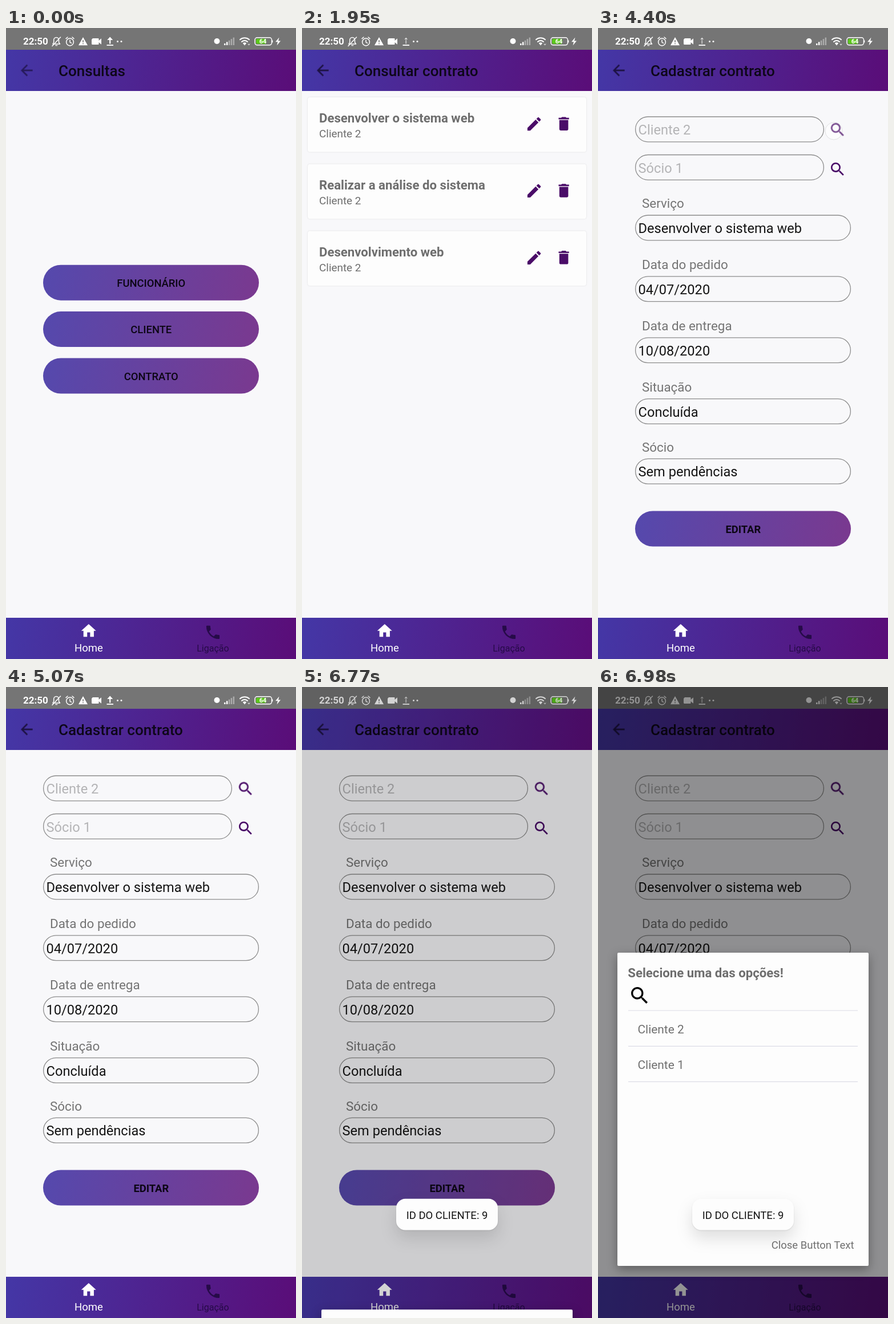
Write an HTML page that moves like this. It is 508 px wide and 1102 px high and loops after 7.03 s.

```html
<!DOCTYPE html>
<html lang="pt-BR">
<head>
<meta charset="utf-8">
<title>Consultas</title>
<style>
html, body { margin: 0; width: 100%; height: 100%; overflow: hidden; background: #f8f8fa; }
svg { display: block; width: 508px; height: 1102px; font-family: Roboto, "Open Sans", sans-serif; }
text { white-space: pre; }
.title { font-size: 26px; font-weight: 500; fill: #0d0718; }
.btn { font-size: 18.4px; text-anchor: middle; fill: #0c0614; }
.card { fill: #fdfdfd; filter: drop-shadow(0 .5px .8px rgba(0,0,0,.12)); }
.ltitle { font-size: 22.2px; font-weight: 700; fill: #6e6e6e; }
.lsub { font-size: 18.9px; fill: #6e6e6e; }
.detail { font-size: 26.1px; fill: #6e6e6e; }
.b { font-weight: 700; }
.label { font-size: 22.4px; fill: #747474; }
.value { font-size: 23.6px; fill: #141414; }
.hint { font-size: 23.6px; fill: #b4b4b6; }
.field { fill: none; stroke: #8c8c8c; stroke-width: 1.3; }
.small { font-size: 18.5px; }
.option { font-size: 20.9px; fill: #707070; }
.line { stroke: #dcdce6; stroke-width: 1.2; }
.purple { fill: #4a0c68; }
</style>
</head>
<body>
<svg viewBox="0 0 508 1102">
  <defs>
    <linearGradient id="bar" gradientUnits="userSpaceOnUse" x1="0" y1="0" x2="508" y2="72">
      <stop offset="0" stop-color="#4437a6"/><stop offset="1" stop-color="#5a0d78"/>
    </linearGradient>
    <linearGradient id="pill" gradientUnits="userSpaceOnUse" x1="0" y1="0" x2="378" y2="62">
      <stop offset="0" stop-color="#5549ad"/><stop offset="1" stop-color="#7a398f"/>
    </linearGradient>
  </defs>
  <rect width="508" height="1102" fill="#f8f8fa"/>
  <rect width="508" height="38" fill="#757575"/>
  <rect width="508" height="72" fill="url(#bar)" transform="translate(0 38)"/>
  <rect width="508" height="72" fill="url(#bar)" transform="translate(0 1030)"/>
  <g id="status" fill="#fff" stroke="#fff" stroke-width="0"></g>
  <g id="nav"></g>
  <g id="menu"></g>
  <g id="list"></g>
  <g id="details"></g>
  <g id="form"></g>
  <rect id="dim" width="508" height="1102" opacity="0"/>
  <g id="modal"></g>
  <g id="toast" opacity="0"></g>
</svg>
<script>
const LOOP = 7030;
const $ = id => document.getElementById(id);

const ICON = {
  back: 'M20,11V13H8L13.5,18.5L12.08,19.92L4.16,12L12.08,4.08L13.5,5.5L8,11H20Z',
  home: 'M10,20V14H14V20H19V12H22L12,3L2,12H5V20H10Z',
  phone: 'M6.62,10.79C8.06,13.62 10.38,15.94 13.21,17.38L15.41,15.18C15.69,14.9 16.08,14.82 16.43,14.93C17.55,15.3 18.75,15.5 20,15.5A1,1 0 0,1 21,16.5V20A1,1 0 0,1 20,21A17,17 0 0,1 3,4A1,1 0 0,1 4,3H7.5A1,1 0 0,1 8.5,4C8.5,5.25 8.7,6.45 9.07,7.57C9.18,7.92 9.1,8.31 8.82,8.59Z',
  pencil: 'M20.71,7.04C21.1,6.65 21.1,6 20.71,5.63L18.37,3.29C18,2.9 17.35,2.9 16.96,3.29L15.12,5.12L18.87,8.87M3,17.25V21H6.75L17.81,9.93L14.06,6.18Z',
  trash: 'M19,4H15.5L14.5,3H9.5L8.5,4H5V6H19M6,19A2,2 0 0,0 8,21H16A2,2 0 0,0 18,19V7H6Z',
  search: 'M15.5 14h-.79l-.28-.27A6.5 6.5 0 1 0 13.73 14.43l.27.28v.79l5 4.99L20.49 19zM9.5 14a4.5 4.5 0 1 1 0-9a4.5 4.5 0 0 1 0 9z'
};

const icon = (name, x, y, k, attrs) =>
  `<path d="${ICON[name]}" transform="translate(${x} ${y}) scale(${k})" fill-rule="evenodd" ${attrs}/>`;
const text = (cls, x, y, s, attrs = '') => `<text class="${cls}" x="${x}" y="${y}" ${attrs}>${s}</text>`;
const title = s => text('title', 92, 84.3, s);
const pill = (y, s, weight) => `<g transform="translate(65 ${y})">
  <rect width="378" height="62" rx="31" fill="url(#pill)"/>${text('btn', 189.3, 38, s, `font-weight="${weight}"`)}</g>`;
const field = (y, w, cls, s) =>
  `<rect class="field" x="65.6" y="${y}" width="${w}" height="43.8" rx="21.9"/>${text(cls, 70.6, y + 31.1, s)}`;

$('status').innerHTML = `
  <text x="30" y="29.3" font-size="17" font-weight="700">22:50</text>
  <g fill="none" stroke-width="1.5" stroke-linecap="round" stroke-linejoin="round">
    <path d="M82 28h12.5l-2-3v-4a4.4 4.4 0 0 0-8.8 0v4zM87 30.6h2.6M81 31.5L95.5 16"/>
    <circle cx="112" cy="24.5" r="6.4"/><path d="M112 21v3.8l2.6 1.6M105 18.6l3-2.6M119 18.6l-3-2.6"/>
    <path d="M176.5 30h11.5" stroke-width="1.8" stroke-linecap="butt"/>
    <path d="M410 20.3a12 12 0 0 1 16 0M413 24a7.6 7.6 0 0 1 10 0" stroke-width="2"/>
    <rect x="436" y="16.8" width="29.5" height="13" rx="4"/>
  </g>
  <path d="M135 16l8 14.3h-16z"/>
  <path d="M134.2 21h1.6v4h-1.6zM134.2 26.6h1.6v1.6h-1.6z" fill="#757575"/>
  <path d="M151.5 18h10a1 1 0 0 1 1 1v3l4.5-3.8v10.6l-4.5-3.8v3a1 1 0 0 1-1 1h-10a1.5 1.5 0 0 1-1.5-1.5v-7a1.5 1.5 0 0 1 1.500-1.500z"/>
  <path id="upFull" d="M182.2 15.5l5 5.500h-3.900v6.500h-2.200v-6.500h-3.900z"/>
  <g id="upPart"><path d="M182.2 16.500l2.800 3.500h-5.600z" opacity=".75"/><path d="M181.300 21h1.800v6.500h-1.800z" opacity=".6"/></g>
  <circle cx="195.500" cy="23.500" r="1.500"/><circle cx="202" cy="23.500" r="1.500"/>
  <circle cx="369.500" cy="23" r="5"/>
  ${[0, 1, 2, 3, 4].map(i => `<rect x="${382 + i * 3.9}" y="${27 - i * 2.6}" width="2.500" height="${3 + i * 2.6}" opacity="${i < 2 ? 1 : .4}"/>`).join('')}
  <path d="M418 30.500l-3.200-4a4.500 4.500 0 0 1 6.400 0z"/>
  <path d="M424 27.500l1.500 2.500 1.500-2.500" fill="none" stroke-width="1"/>
  <rect x="438" y="18.800" width="18" height="9" rx="2" fill="#5cc81c"/>
  <path d="M466.500 21.500v3.800" stroke-width="1.600"/>
  <text x="450" y="27.300" font-size="11" font-weight="700" text-anchor="middle">64</text>
  <path d="M478.500 16.500l-6.500 7.700h4l-1.500 6.300 6.500-8h-4z"/>`;

$('nav').innerHTML =
  icon('back', 20.6, 58.4, 1.3, 'id="back" fill="#1d1242"') +
  icon('home', 129.2, 1037.2, 1.3, 'fill="#fff"') +
  text('small', 145, 1088.6, 'Home', 'text-anchor="middle" fill="#fff"') +
  icon('phone', 347, 1040, 1.29, 'fill="#260b48"') +
  text('', 362.4, 1088.6, 'Ligação', 'font-size="16" text-anchor="middle" fill="#260b48"');

$('menu').innerHTML = title('Consultas') +
  ['FUNCIONÁRIO', 'CLIENTE', 'CONTRATO'].map((s, i) => pill(413.7 + i * 81.4, s, 500)).join('');

$('list').innerHTML = title('Consultar contrato') + '<g id="cards">' +
  ['Desenvolver o sistema web', 'Realizar a análise do sistema', 'Desenvolvimento web'].map((s, i) =>
    `<g transform="translate(0 ${i * 116.8})"><rect class="card" x="10" y="121" width="488" height="95.500" rx="4"/>` +
    text('ltitle', 30, 165, s) + text('lsub', 30, 191, 'Cliente 2') +
    icon('pencil', 391, 152, 1.3, 'class="purple"') + icon('trash', 443, 151.6, 1.3, 'class="purple"') + '</g>'
  ).join('') + '</g>';

const facts = [
  ['Cliente', 'Cliente 2'], ['CNPJ', '98765432198765'], ['Telefone', '11111111111'],
  ['Serviço', 'Desenvolver o sistema web'], ['Sócio', 'Sócio 1'], ['Cargo', 'Desenvolvedor Mobile'],
  ['Data do pedido', '04/07/2020'], ['Data de entrega', '10/08/2020'],
  ['Situação', 'Concluída'], ['Comentário', 'Sem pendências']
];
$('details').innerHTML = title('Detalhes do contrato') + '<g id="facts">' + facts.map(([k, v], i) =>
  text('detail', 25, 151.4 + i * 48.03, `<tspan class="b">${k}: </tspan><tspan class="${i == 3 ? 'b' : ''}">${v}</tspan>`)
).join('') + '</g>';

const inputs = [
  [327, 'Serviço', 'Desenvolver o sistema web'], [433.8, 'Data do pedido', '04/07/2020'],
  [540.8, 'Data de entrega', '10/08/2020'], [647.6, 'Situação', 'Concluída'], [752.3, 'Sócio', 'Sem pendências']
];
$('form').innerHTML = title('Cadastrar contrato') +
  field(155, 329.800, 'hint', 'Cliente 2') + field(221.5, 329.800, 'hint', 'Sócio 1') +
  '<circle id="touch" cx="413" cy="180" r="15" fill="#fff" fill-opacity=".5" stroke="#000" stroke-opacity=".1" opacity="0"/>' +
  icon('search', 404, 162, 1.31, 'id="find" class="purple"') + icon('search', 404, 231, 1.31, 'class="purple"') +
  inputs.map(([y, k, v]) => text('label', 77, y - 12.800, k) + field(y, 376.800, 'value', v)).join('') +
  pill(843.5, 'EDITAR', 700);

// Drawn with its top edge at zero
$('modal').innerHTML = `<rect x="34" width="440" height="547" rx="2" fill="#fdfdfd" style="filter:drop-shadow(0 6px 9px rgba(0,0,0,.35))"/>` +
  text('ltitle', 52.3, 43, 'Selecione uma das opções!') +
  icon('search', 53, 55, 1.66, 'fill="#000"') +
  [101, 163.3, 225.3].map(y => `<path class="line" d="M53 ${y}H455"/>`).join('') +
  text('option', 69.500, 140.5, 'Cliente 2') + text('option', 69.500, 202.800, 'Cliente 1') +
  text('small', 448.500, 516.5, 'Close Button Text', 'text-anchor="end" fill="#707070"');

$('toast').innerHTML = `<rect x="165" y="893.8" width="178" height="54.700" rx="16" fill="#fdfdfd" style="filter:drop-shadow(0 1px 1px rgba(0,0,0,.1)) drop-shadow(0 14px 14px rgba(0,0,0,.12))"/>` +
  text('small', 254, 928.5, 'ID DO CLIENTE: 9', 'text-anchor="middle" fill="#111"');

// Steps are [ms, value, easing to next]; first and last values are held
function track(id, prop, steps) {
  const all = [[0, steps[0][1]], ...steps, [LOOP, steps[steps.length - 1][1]]];
  const anim = $(id).animate(
    all.map(([t, v, easing = 'linear']) => ({ offset: t / LOOP, [prop]: v, easing })),
    { duration: LOOP, iterations: Infinity });
  anim.startTime = start;
}
const start = document.timeline.currentTime || 0;
const fade = (id, ...steps) => track(id, 'opacity', steps);
const shift = y => `translate(0px, ${y}px)`;

fade('back', [0, .75], [120, 1]);
fade('menu', [750, 1], [900, 0]);
fade('list', [750, 0], [900, 1], [2000, 1], [2160, 0], [3150, 0], [3300, 1], [3760, 1], [3910, 0]);
fade('cards', [1150, 0], [1230, 1]);
fade('details', [2000, 0], [2160, 1], [3150, 1], [3300, 0]);
fade('facts', [2200, 0], [2320, 1]);
fade('form', [3760, 0], [3910, 1]);
fade('touch', [4330, 0], [4360, 1], [4440, 1], [4520, 0]);
fade('find', [4330, 1], [4390, .75], [4440, .75], [4600, 1]);
fade('toast', [5850, 0], [6020, 1]);
fade('dim', [6675, 0, 'ease-in'], [6770, .17, 'cubic-bezier(.33,.5,.67,.9)'], [6980, .425]);
track('modal', 'transform', [
  [6675, shift(1522), 'ease-in'], [6770, shift(1093), 'cubic-bezier(.33,.64,.67,.91)'], [6980, shift(464)]
]);

// Upload arrow: solid for the first part of each second, then faint
const solid = t => t % 1000 < 300;
(function tick() {
  const t = ((document.timeline.currentTime || 0) - start) % LOOP;
  $('upFull').style.opacity = solid(t) ? 1 : 0;
  $('upPart').style.opacity = solid(t) ? 0 : 1;
  requestAnimationFrame(tick);
})();
</script>
</body>
</html>
```
